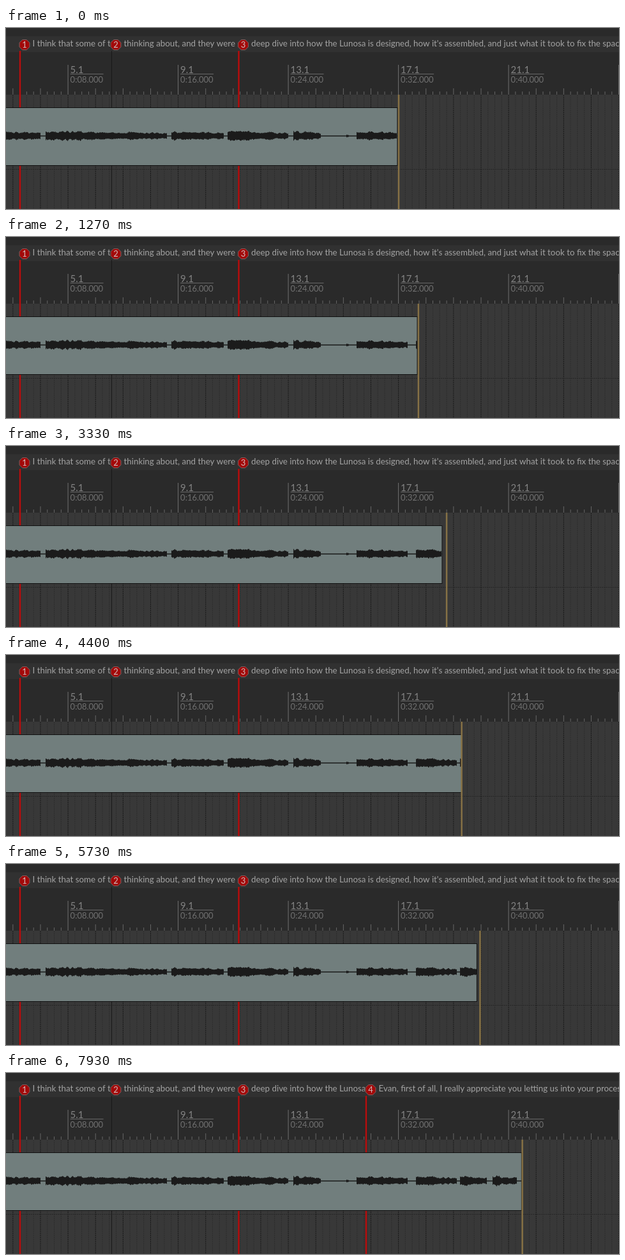
An HTML page with a canvas for the animation above (8000 ms loop, 960x285 px).

```html
<!DOCTYPE html>
<html lang="en">
<head>
<meta charset="utf-8">
<title>Audio timeline recording</title>
<style>
html, body { margin: 0; width: 100%; height: 100%; overflow: hidden; background: #383838; }
canvas { display: block; }
</style>
</head>
<body>
<canvas id="stage" width="960" height="285"></canvas>
<script>
const W = 960, H = 285, LOOP = 8000;
const ctx = document.getElementById('stage').getContext('2d');

const RULER_Y = 38, TRACK_Y = 105;
const CLIP = { top: 125, bottom: 217, mid: 170 };
const BAR0 = 96.6, BAR = 172.5;

const markers = [
  { x: 22, label: 'I think that some of the things' },
  { x: 165, label: 'thinking about, and they were', plain: true },
  { x: 364.5, label: "deep dive into how the Lunosa is designed, how it's assembled, and just what it took to fix the spacecraft" },
  { x: 564, label: 'Evan, first of all, I really appreciate you letting us into your process', from: 6860 }
];

// Playhead path: seconds, x
const path = [[0, 615], [1.27, 646], [3.33, 690], [4.4, 713.6], [7.93, 790]];

// Spoken phrases: start x, end x
const phrases = [[-40, 54], [62, 252], [259, 341], [347, 442], [450, 493], [533, 537], [549, 629], [642, 706], [711, 753], [762, 800]];

function hash(n) {
  const s = Math.sin(n * 127.1 + 11.7) * 43758.5453;
  return s - Math.floor(s);
}

function smoothNoise(x) {
  const i = Math.floor(x), f = x - i;
  return hash(i) + (hash(i + 1) - hash(i)) * f * f * (3 - 2 * f);
}

// Each phrase starts loud and fades, broken up into syllables
function loudness(x) {
  const phrase = phrases.find(([a, b]) => x >= a && x < b);
  if (!phrase) return 0;
  const [a, b] = phrase;
  const peak = Math.min(9, (b - a) * 0.5);
  return peak * (1 - 0.4 * (x - a) / (b - a)) * (0.55 + 0.45 * smoothNoise(x / 4));
}

const wave = Array.from({ length: W }, (_, x) => {
  const a = loudness(x);
  return [a * (0.8 + 0.2 * hash(x)), a * (0.7 + 0.25 * hash(x + W))];
});

function playheadAt(s) {
  const i = Math.max(1, path.findIndex(p => p[0] >= s));
  const [t0, x0] = path[i - 1], [t1, x1] = path[i];
  return x0 + (x1 - x0) * (s - t0) / (t1 - t0);
}

// The recorded clip grows in even chunks behind the playhead
function clipEnd(head) {
  const first = 612.9, chunk = 7.78;
  return first + chunk * Math.floor((head + 0.5 - first) / chunk);
}

function rect(x, y, w, h, color) {
  ctx.fillStyle = color;
  ctx.fillRect(x, y, w, h);
}

function text(str, x, y, size, color) {
  ctx.font = `${size}px Lato, "Open Sans", sans-serif`;
  ctx.fillStyle = color;
  ctx.fillText(str, x, y);
}

function dotted(x0, y0, x1, y1, color) {
  ctx.strokeStyle = color;
  ctx.lineWidth = 1;
  ctx.setLineDash([2, 1]);
  ctx.beginPath();
  ctx.moveTo(x0, y0);
  ctx.lineTo(x1, y1);
  ctx.stroke();
  ctx.setLineDash([]);
}

function drawPanels() {
  rect(0, 0, W, H, '#383838');
  rect(0, 0, W, TRACK_Y, '#2a2a2a');
  rect(0, 13, W, RULER_Y - 13, '#313131');
}

function drawGrid() {
  for (let i = -8; i <= 80; i++) {
    const x = BAR0 + i * BAR / 16;
    const beat = i % 4 === 0, bar = i % 16 === 0;
    dotted(x + 0.5, TRACK_Y, x + 0.5, H, beat ? '#181818' : '#2d2d2d');
    const top = bar ? 58 : beat ? 95 : 100;
    rect(x, top, 1, TRACK_Y - top, bar ? '#707070' : '#666');
  }
  dotted(0, 222.5, W, 222.5, '#262626');
}

function drawRuler() {
  for (let i = 0; i < 5; i++) {
    const x = BAR0 + i * BAR + 4;
    const secs = String(8 + i * 8).padStart(2, '0');
    text(`${5 + i * 4}.1`, x, 71, 15, '#828282');
    rect(x, 72, 52, 1, '#686868');
    text(`0:${secs}.000`, x, 85.5, 13, '#707070');
  }
}

function drawMarkerLine(m) {
  if (m.plain) rect(m.x, RULER_Y - 2, 1, H, '#181818');
  else {
    rect(m.x - 1.5, RULER_Y - 2, 3, H, '#6a1515');
    rect(m.x - 1, RULER_Y - 2, 2, H, '#b80f0f');
  }
}

function drawMarker(m, i, end) {
  ctx.save();
  ctx.beginPath();
  ctx.rect(m.x, 12, end - m.x - 2, 26);
  ctx.clip();
  text(m.label, m.x + 19.5, 28.5, 13.35, '#a3a3a3');
  ctx.restore();

  const cx = m.x + 7, cy = 26.5, r = 8.6;
  ctx.beginPath();
  for (let k = 0; k < 8; k++) {
    const a = (k + 0.5) * Math.PI / 4;
    ctx.lineTo(cx + r * Math.cos(a), cy + r * Math.sin(a));
  }
  ctx.closePath();
  ctx.fillStyle = '#a30909';
  ctx.fill();
  ctx.strokeStyle = '#806060';
  ctx.lineWidth = 1;
  ctx.stroke();
  ctx.textAlign = 'center';
  text(String(i + 1), cx, 31, 13, '#d0bcbc');
  ctx.textAlign = 'left';
}

function drawClip(end) {
  const { top, bottom, mid } = CLIP;
  rect(0, top, end + 0.5, bottom - top, '#111');
  rect(0, top + 1, end - 0.5, bottom - top - 2, '#717e7d');
  rect(0, mid - 0.5, end, 1, '#1b1b1b');
  ctx.fillStyle = '#1b1b1b';
  for (let x = 0; x < end - 1; x++) {
    const [up, down] = wave[x];
    ctx.fillRect(x, mid - 0.5 - up, 1, up + down + 1);
  }
}

function drawPlayhead(x) {
  rect(x - 1.25, TRACK_Y, 2.5, H - TRACK_Y, '#867145');
}

function draw(ms) {
  const step = Math.floor((Math.floor(ms / 10) + 0.5) * 0.15);
  const t = step * 1000 / 15;
  const head = playheadAt(t / 1000);
  const shown = markers.filter(m => !m.from || t >= m.from);

  drawPanels();
  drawGrid();
  drawRuler();
  shown.forEach(drawMarkerLine);
  drawClip(clipEnd(head));
  drawPlayhead(head);
  shown.forEach((m, i) => drawMarker(m, i, i + 1 < shown.length ? shown[i + 1].x : W + 2));
}

const start = performance.now();
function tick() {
  draw((performance.now() - start) % LOOP);
  requestAnimationFrame(tick);
}
tick();
</script>
</body>
</html>
```
